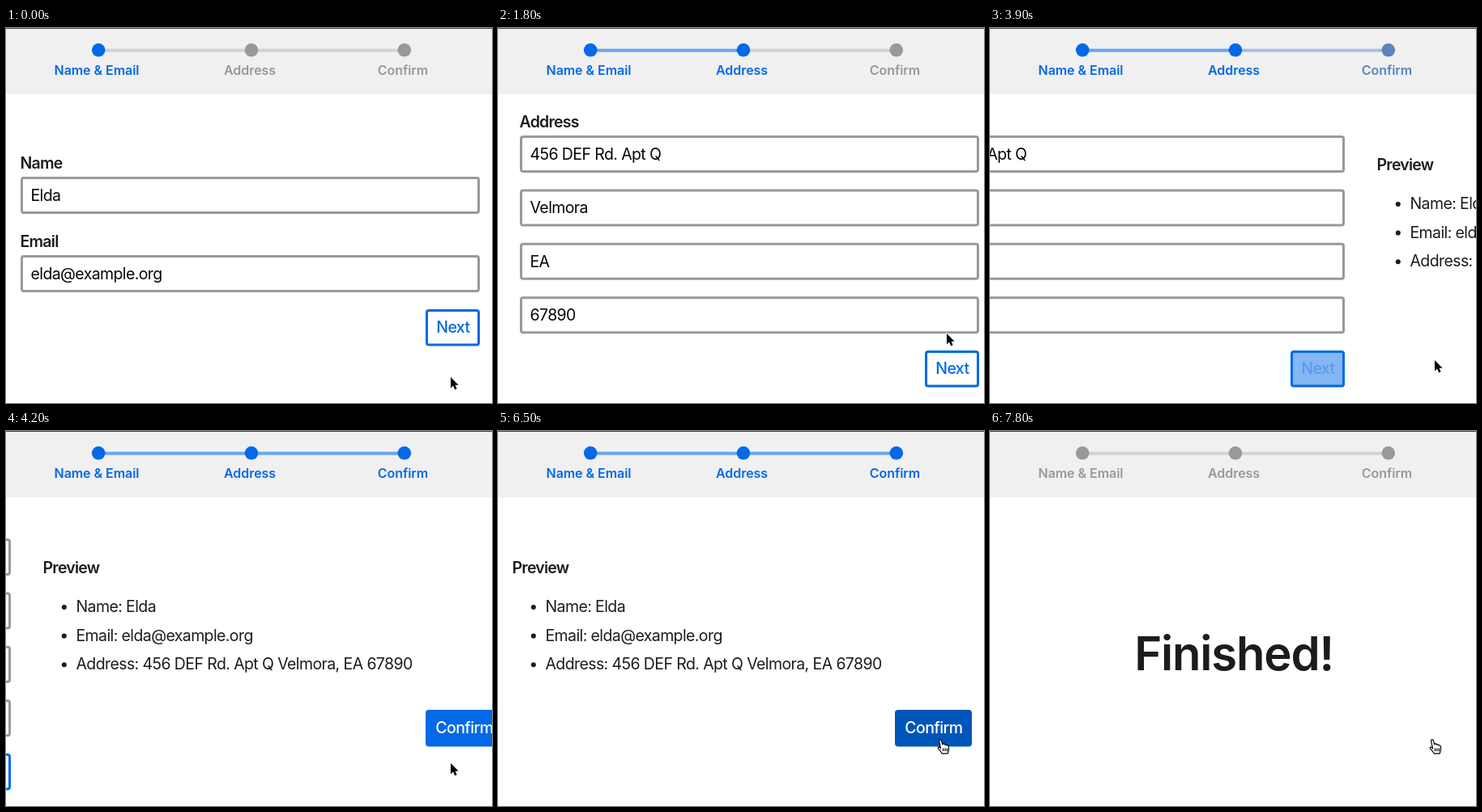
These frames come from a looping animation (600 px wide and 464 px high, 8400 ms). An HTML page:

```html
<!DOCTYPE html>
<html lang="en">
<head>
<meta charset="utf-8">
<title>Sign-up steps</title>
<style>
  html, body { margin: 0; width: 100%; height: 100%; overflow: hidden; background: #fff; }
  svg { display: block; width: 600px; height: 464px; }
  text { font-family: Inter, "Open Sans", sans-serif; font-size: 19.5px; letter-spacing: -0.6px; fill: #1c1c1c; white-space: pre; }
  .value { fill: #060606; }
  .strong { font-weight: 600; letter-spacing: -0.75px; }
  .step { font-size: 16px; font-weight: 600; letter-spacing: -0.05px; text-anchor: middle; }
  .button { font-weight: 500; text-anchor: middle; }
  .done { font-size: 58px; font-weight: 600; letter-spacing: -1.2px; text-anchor: middle; }
</style>
</head>
<body>
<svg id="stage" viewBox="0 0 600 464"></svg>
<script>
const LOOP = 8400, TICK = 100, PAGE = 607;
const BLUE = [3, 105, 230], DARK = [0, 86, 184], GREY = [153, 153, 153];
const WHITE = [255, 255, 255], RAIL = [210, 210, 210], RAIL_ON = [105, 165, 240];

const person = { name: "Elda", email: "elda@example.org" };
const place = ["456 DEF Rd. Apt Q", "Velmora", "EA", "67890"];

const stage = document.getElementById("stage");
function add(parent, tag, attrs, content) {
  const el = document.createElementNS("http://www.w3.org/2000/svg", tag);
  for (const key in attrs) el.setAttribute(key, attrs[key]);
  if (content) el.textContent = content;
  return parent.appendChild(el);
}
const rgb = c => `rgb(${c.map(Math.round).join(",")})`;
const mix = (a, b, k) => a.map((v, i) => v + (b[i] - v) * k);

// Form parts
const label = (page, y, s) => add(page, "text", { x: 17.5, y, class: "strong" }, s);
function field(page, y, s) {
  add(page, "rect", { x: 19.5, y: y + 1.5, width: 564, height: 43, rx: 2.5,
    fill: "#fff", stroke: "#999", "stroke-width": 3 });
  add(page, "text", { x: 30.5, y: y + 30, class: "value" }, s);
}
function button(page, x, y, s) {
  const box = add(page, "rect", { x: x + 1.5, y: y + 1.5, width: 582 - x, height: 42.5, rx: 2.5, "stroke-width": 3 });
  const text = add(page, "text", { x: (x + 585) / 2 + 0.4, y: y + 29.3, class: "button" }, s);
  return (fill, edge, ink) => {
    box.setAttribute("fill", rgb(fill));
    box.setAttribute("stroke", rgb(edge));
    text.style.fill = rgb(ink);
  };
}

// Pages
const pages = [0, 1, 2, 3].map(() => add(stage, "g", {}));
label(pages[0], 174, "Name");
field(pages[0], 184, person.name);
label(pages[0], 271, "Email");
field(pages[0], 281, person.email);
const next1 = button(pages[0], 518, 348, "Next");

label(pages[1], 123, "Address");
place.forEach((s, i) => field(pages[1], 133 + i * 66.4, s));
const next2 = button(pages[1], 518, 399, "Next");

label(pages[2], 176, "Preview");
const [street, city, state, zip] = place;
[`Name: ${person.name}`, `Email: ${person.email}`, `Address: ${street} ${city}, ${state} ${zip}`]
  .forEach((s, i) => {
    const y = 224 + i * 35.6;
    add(pages[2], "circle", { cx: 43.8, cy: y - 6, r: 3, fill: "#1c1c1c" });
    add(pages[2], "text", { x: 58.5, y }, s);
  });
const confirm = button(pages[2], 490, 345, "Confirm");
add(pages[3], "text", { x: 301, y: 296, class: "done" }, "Finished!");

// Progress header
add(stage, "rect", { width: 600, height: 82, fill: "#f0f0f0" });
add(stage, "rect", { width: 600, height: 1, fill: "#444" });
const rails = [114, 303].map(x => add(stage, "rect", { x, y: 25.7, width: 189, height: 4 }));
const steps = ["Name & Email", "Address", "Confirm"].map((s, i) => ({
  dot: add(stage, "circle", { cx: 114.2 + i * 188.8, cy: 27.3, r: 8.3 }),
  text: add(stage, "text", { x: 112 + i * 189, y: 58, class: "step" }, s)
}));

// Cursors, both with the hot spot at 0,0
const arrow = add(stage, "path", {
  d: "M0 0V13.4L3 10.6L5.2 15.4L7.6 14.3L5.5 9.7H9.6Z",
  fill: "#000", stroke: "#fff", "stroke-width": 1.2, "paint-order": "stroke"
});
const hand = add(stage, "g", { fill: "#fff", stroke: "#000", "stroke-width": 1.1, "stroke-linejoin": "round" });
const glove = add(hand, "g", { transform: "translate(-1.2 -.4) scale(1.1)" });
add(glove, "path", {
  d: "M-1 2.2q-.4-1.8 1-2q1.2-.1 1.6 1.4l1 4q.6-1.2 2-.6q.4.2.6.9q1.6-.7 2.3.8q1.8-.4 2.1 1.4" +
     "q.6 3-.4 5.5l-.6 2.4h-6.4q-1.3-2.6-3.3-4.6q-1.8-1.8-.8-2.6q1.2-.7 2.6 1.4z"
});
add(glove, "path", { d: "M3.4 10v3.4M5.6 10v3.4M7.8 10v3.4", fill: "none" });

// Timing
const slides = [1322, 3828, 7232];
const path = [
  [0, 549, 432], [100, 549, 427], [200, 551, 405], [300, 553, 385], [400, 554, 377],
  [1200, 554, 378], [2400, 554, 378], [2600, 553, 386], [2800, 551, 401], [2900, 550, 408],
  [3000, 549, 411], [3500, 549, 411], [3600, 549, 412], [3700, 549, 411], [6000, 549, 411],
  [6200, 548, 402], [6300, 548, 392], [6400, 547, 385], [6500, 547, 382]
];
const handTimes = [[300, 1350], [2800, 3860], [6400, LOOP]];

// Critically damped spring
function spring(ms) {
  if (ms <= 0) return 0;
  if (ms > 560) return 1;
  const k = ms * 0.01304;
  return 1 - (1 + k) * Math.exp(-k);
}
// The CSS "ease" curve, solved by bisection
function ease(x) {
  if (x <= 0) return 0;
  if (x >= 1) return 1;
  const bez = (u, a, b) => 3 * a * u * (1 - u) ** 2 + 3 * b * u * u * (1 - u) + u ** 3;
  let lo = 0, hi = 1;
  for (let i = 0; i < 20; i++) {
    const mid = (lo + hi) / 2;
    if (bez(mid, 0.25, 0.25) < x) lo = mid; else hi = mid;
  }
  return bez(lo, 0.1, 1);
}
const fade = (t, from, ms) => ease((t - from) / ms);

function cursorAt(t) {
  const i = path.findIndex(p => p[0] > t);
  if (i < 0) return path[path.length - 1].slice(1);
  const [a, b] = [path[i - 1], path[i]];
  const k = (t - a[0]) / (b[0] - a[0]);
  return mix(a.slice(1), b.slice(1), k).map(Math.round);
}

// Outline button: the text turns white a little later than the fill turns blue
function paintNext(paint, hover) {
  paint(mix(WHITE, BLUE, hover), BLUE, mix(BLUE, WHITE, hover ** 1.5));
}

function draw(t) {
  const shift = slides.reduce((sum, s) => sum + spring(t - s), 0);
  pages.forEach((page, i) =>
    page.setAttribute("transform", `translate(${Math.round((i - shift) * PAGE)} 0)`));

  const off = fade(t, slides[2], 280);
  const lit = [1, fade(t, slides[0], 280), fade(t, slides[1], 280)].map(v => v * (1 - off));
  steps.forEach(({ dot, text }, i) => {
    const color = rgb(mix(GREY, BLUE, lit[i]));
    dot.setAttribute("fill", color);
    text.style.fill = color;
  });
  rails.forEach((rail, i) => rail.setAttribute("fill", rgb(mix(RAIL, RAIL_ON, lit[i + 1]))));

  paintNext(next1, fade(t, 250, 150) - fade(t, 1350, 150));
  paintNext(next2, fade(t, 2770, 150) - fade(t, 3855, 150));
  const solid = mix(BLUE, DARK, fade(t, 6350, 150));
  confirm(solid, solid, WHITE);

  const isHand = handTimes.some(([a, b]) => t >= a && t < b);
  const [x, y] = cursorAt(t);
  for (const el of [arrow, hand]) el.setAttribute("transform", `translate(${x} ${y})`);
  arrow.style.display = isHand ? "none" : "";
  hand.style.display = isHand ? "" : "none";
}

const start = performance.now();
function frame() {
  const t = (performance.now() - start) % LOOP;
  draw(Math.floor(t / TICK) * TICK);
  requestAnimationFrame(frame);
}
frame();
</script>
</body>
</html>
```
